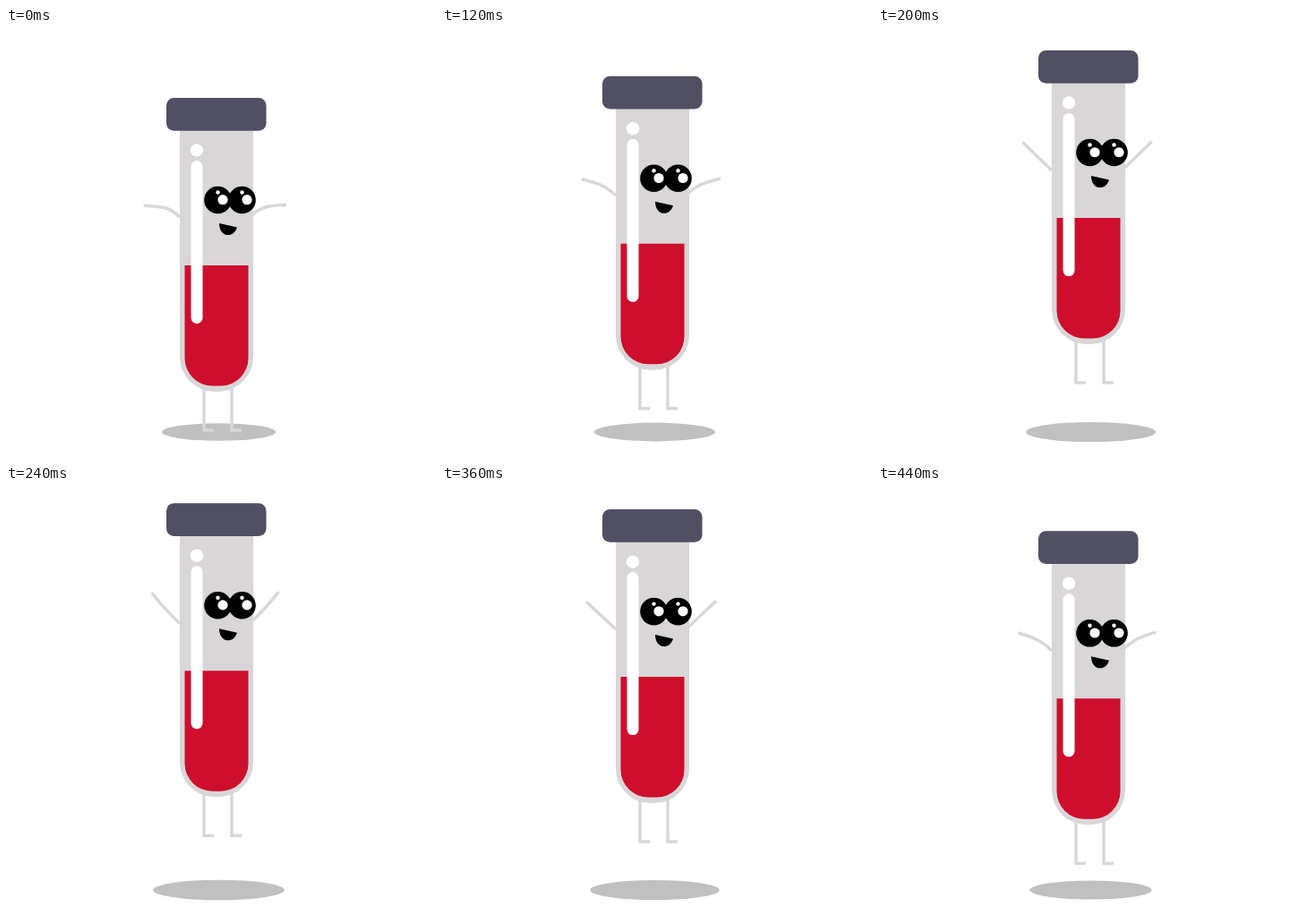
Recreate the animation shown at these times as an HTML page. Size 480 by 480 pixels, loop 0.48 s.

```html
<!DOCTYPE html>
<html lang="en">
<head>
<meta charset="utf-8">
<title>Jumping test tube</title>
<style>
  html, body { margin: 0; width: 100%; height: 100%; overflow: hidden; background: #fff; }
  svg { display: block; width: 100vw; height: 100vh; }
  .limb { fill: none; stroke: #d9d7d8; stroke-width: 3.5; }
  .glass { fill: #d9d6d8; }
  .shine { fill: #fff; }
</style>
</head>
<body>
<svg viewBox="0 0 480 480">
  <ellipse id="shadow" cx="237.5" cy="451" rx="63.5" ry="9.8" fill="#c0c0c0"/>
  <g id="tube">
    <path class="limb" d="M221 400V449H232M252 400V449H263"/>
    <path class="limb arm"/>
    <path class="limb arm" transform="matrix(-1 0 0 1 467 -.8)"/>
    <path class="glass" d="M194 110H276V367A39 39 0 0 1 237 406H233A39 39 0 0 1 194 367Z"/>
    <path fill="#cd0e2d" d="M199.5 265H270.5V368.5A31 31 0 0 1 239.5 399.5H230.5A31 31 0 0 1 199.5 368.5Z"/>
    <rect x="179" y="78" width="111.5" height="36.7" rx="8.5" fill="#504f63"/>

    <circle class="shine" cx="213" cy="136.5" r="7.2"/>
    <rect class="shine" x="206.5" y="148" width="13" height="182" rx="6.5"/>

    <circle cx="236.5" cy="192" r="15.3"/>
    <circle cx="263.5" cy="192" r="15.3"/>
    <g class="shine">
      <circle cx="242" cy="191.7" r="5.6"/>
      <circle cx="269" cy="191.7" r="5.6"/>
      <circle cx="236.5" cy="183.5" r="2.2"/>
      <circle cx="263.5" cy="183.5" r="2.2"/>
    </g>
    <path d="M238 218L258 222.5C256 229 251.5 231.5 247 231C242 230.5 238 226 238 218Z"/>
  </g>
</svg>
<script>
  const LOOP = 480, STEP = 40, HEIGHT = 60.3;
  const armDown = [194, 211, 183, 200, 176, 200, 153, 200];
  const armUp = [194, 212, 184, 203, 174, 192, 163, 177];

  const tube = document.getElementById("tube");
  const shadow = document.getElementById("shadow");
  const arms = document.querySelectorAll(".arm");
  const clamp = x => Math.min(1, Math.max(0, x));

  // crouch for two steps, leap with an ease-out, then fall ever faster
  function liftAt(step) {
    const rise = 1 - (1 - clamp((step - 2) / 5)) ** 2.3;
    const fall = Math.max(0, step - 5.5);
    return HEIGHT * rise - 0.196 * fall ** 3;
  }

  function armPath(raise) {
    const [x, y, ...curve] = armDown.map((v, i) => v + (armUp[i] - v) * raise);
    return `M${x} ${y}C${curve.join(" ")}`;
  }

  function draw(now) {
    const step = Math.floor((now % LOOP) / STEP);
    const lift = liftAt(step);
    const settle = 0.08 - 0.04 * step;
    const raise = Math.max(settle, (lift / HEIGHT) ** 1.3);

    tube.setAttribute("transform", `translate(0 ${-lift})`);
    shadow.setAttribute("rx", 63.5 + lift / 6);
    shadow.setAttribute("ry", 9.8 + lift / 40);
    arms.forEach(arm => arm.setAttribute("d", armPath(raise)));
  }

  let start;
  function tick(now) {
    start ??= now;
    draw(now - start);
    requestAnimationFrame(tick);
  }
  draw(0);
  requestAnimationFrame(tick);
</script>
</body>
</html>
```
